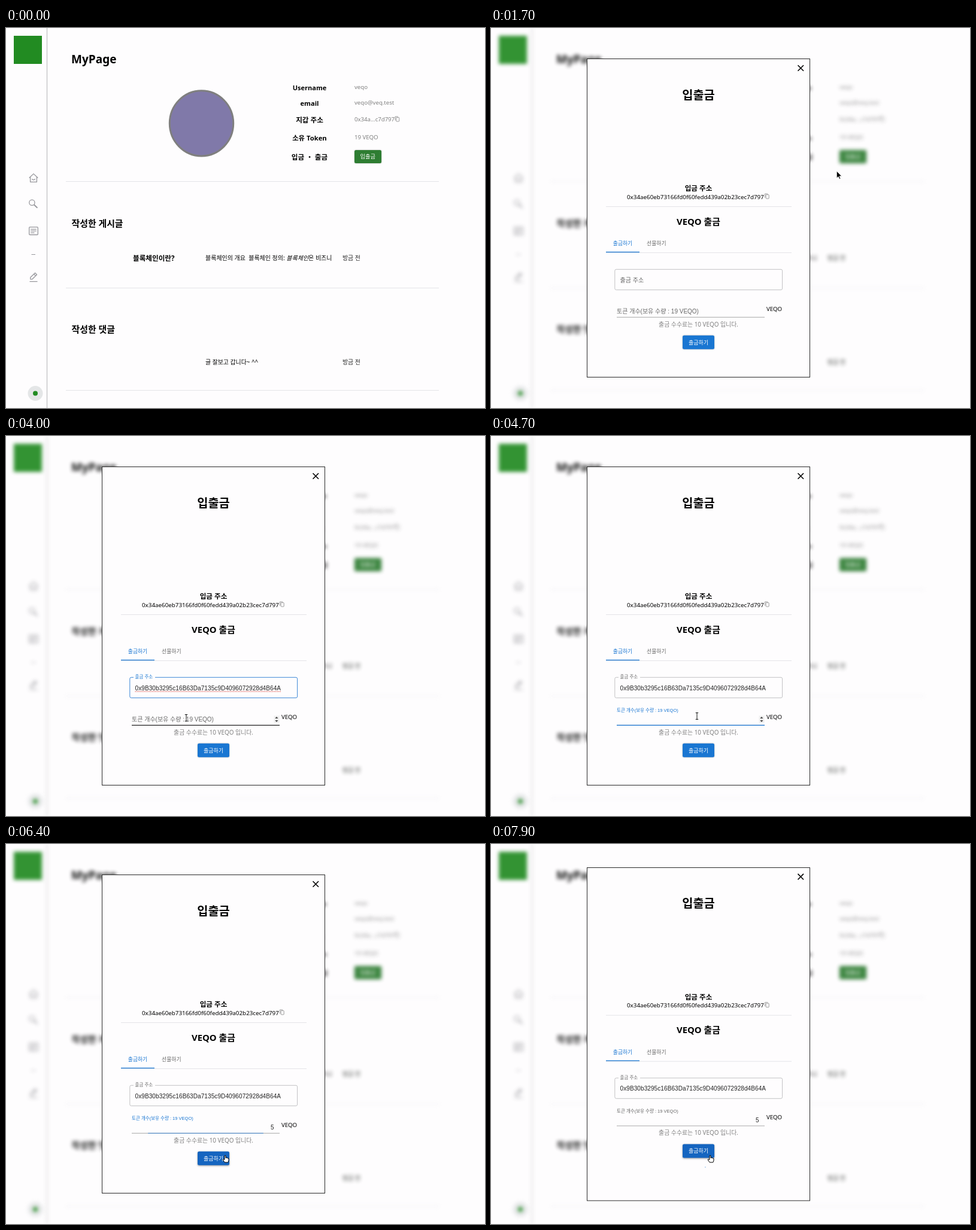
Animation of 800 by 635 pixels, one loop 8 s. Source, as an HTML page:

```html
<!DOCTYPE html>
<html lang="ko">
<head>
<meta charset="utf-8">
<title>MyPage</title>
<style>
  html, body { margin: 0; width: 100%; height: 100%; overflow: hidden; background: #fefdfe; }
  svg { display: block; width: 800px; height: 635px; }
  text { font-family: "Noto Sans", "Noto Sans CJK KR", "Noto Sans CJK", sans-serif; white-space: pre; }
  .ui { font-family: "Liberation Sans", "Noto Sans CJK KR", "Noto Sans CJK", sans-serif; }
  .icon { fill: none; stroke: #97979c; stroke-width: 1.3; stroke-linejoin: round; }
  .rule { stroke: #e4e4e8; }
  .soft { filter: drop-shadow(0 .8px .8px rgba(0,0,0,.3)); }
  .lift { filter: drop-shadow(0 1.5px 1.8px rgba(0,0,0,.4)); }
  .veiled { filter: blur(3.4px); opacity: .92; }
</style>
</head>
<body>
<svg id="stage" viewBox="0 0 800 635"></svg>
<script>
const LOOP = 8000, STEP = 100;
const BLUE = '#1976d2', GRAY = '#808080', LABEL = '#666';
const WALLET = '0x34ae60eb73166fd0f60fedd439a02b23cec7d797';
const TARGET = '0x9B30b3295c16B63Da7135c9D4096072928d4B64A';
const TOKEN = 'VEQO';

// Moments of the interaction, in ms
const AT = {
  enter: 100, hover: 1000, open: 1400, focusAddr: 2500, list: 2600, pick: 3300,
  hoverAmount: 3800, focusAmount: 4200, type: 5200, leaveAmount: 5700,
  hoverSend: 6000, blur: 6356, send: 6500
};

const text = (x, y, size, str, attrs = '') =>
  `<text x="${x}" y="${y}" font-size="${size}" ${attrs}>${str}</text>`;
const rule = (x1, x2, y) => `<path class="rule" d="M${x1} ${y}H${x2}"/>`;
const bold = 'font-weight="700"', mid = 'text-anchor="middle"';
const boldMid = `${bold} ${mid}`;
const gray = `fill="${GRAY}"`;
const copyIcon = (x, y) => `<g transform="translate(${x} ${y})" fill="none" stroke="#858585" stroke-width=".8">
  <rect x="2.2" y="2" width="5" height="6.6" rx=".8"/><path d="M.5 7V.5H5.4"/></g>`;

const page = `
<g id="page">
  <rect x="13" y="13" width="47" height="47" fill="#228b22"/>
  <path d="M68.5 0V635" stroke="#b4b4b6"/>
  <g class="icon">
    <path d="M38.7 250.5L46 243.6L53.3 250.5M40.6 249V257.3H51.4V249M43.2 252.2Q46 255.4 48.8 252.2"/>
    <circle cx="43.4" cy="291.8" r="4.6"/><path d="M46.8 295.2L52.4 300.6" stroke-width="2"/>
    <rect x="38.7" y="332.7" width="14.6" height="12.8" rx="1.2"/>
    <path d="M41.3 336.3H50.7M41.3 339.2H50.7M41.3 342.1H47.5"/>
    <path d="M42.5 378.5H49" stroke-width="1"/>
    <path d="M40.8 419.8V416.8L48.6 409.3L51.5 412.2L43.8 419.8ZM46.6 411.2L49.5 414.1M39.5 423.6H52.5"/>
  </g>
  <circle cx="49" cy="610.5" r="12.5" fill="#e4e6e7"/>
  <circle cx="49" cy="610.5" r="4" fill="#228b22"/>
  ${text(109, 58.5, 19, 'MyPage', bold)}
  <ellipse cx="326.5" cy="159.3" rx="53.2" ry="54.6" fill="#8079a9" stroke="#7f7f7f" stroke-width="3"/>
  ${text(507, 104, 11, 'Username', boldMid)}
  ${text(507, 129.5, 11.1, 'email', boldMid)}
  ${text(507, 158, 11.6, '지갑 주소', boldMid)}
  ${text(507, 188, 11.3, '소유 Token', boldMid)}
  ${text(507, 220, 11.6, '입금 ・ 출금', boldMid)}
  ${text(582, 102.3, 9.6, 'veqo', gray)}
  ${text(582, 128, 9.6, 'veqo@veq.test', gray)}
  ${text(582, 156, 9.6, '0x34a...c7d797', gray)}
  ${copyIcon(649.5, 147.5)}
  ${text(582, 185.7, 9.6, '19 ' + TOKEN, gray)}
  <rect id="openBtn" x="582" y="204" width="45" height="22" rx="2.5"/>
  ${text(604.3, 218.4, 9.2, '입출금', `${mid} fill="#fff" font-weight="500"`)}
  ${rule(100, 723, 256.5)}
  ${text(109.5, 331.5, 14.9, '작성한 게시글', bold)}
  ${text(212, 388.5, 11.6, '블록체인이란?', bold)}
  ${text(333, 388, 10, '블록체인의 개요\u00a0 블록체인 정의: <tspan font-style="italic">블록체인</tspan>은 비즈니', 'font-weight="500"')}
  ${text(562, 388, 9.9, '방금 전', 'fill="#222"')}
  ${rule(100, 723, 434.5)}
  ${text(109.5, 509, 14.9, '작성한 댓글', bold)}
  ${text(333, 562, 9.9, '글 잘보고 갑니다~ ^^', 'font-weight="500"')}
  ${text(562, 562, 9.9, '방금 전', 'fill="#222"')}
  ${rule(100, 723, 605.5)}
</g>`;

const modal = `
<g id="modal">
  <rect id="panel" x="160.5" width="372" fill="#fefdfe" stroke="#2a2a2a"/>
  <g id="body">
    <path d="M512.5 62.2L522 71.8M522 62.2L512.5 71.8" stroke="#000" stroke-width="1.6"/>
    ${text(346.5, 118.5, 19.8, '입출금', boldMid)}
    ${text(346.5, 272, 11.6, '입금 주소', boldMid)}
    ${text(227, 285.5, 9.82, WALLET)}
    ${copyIcon(457, 276.5)}
    ${rule(192, 502, 298.5)}
    ${text(346.5, 328.6, 14.9, TOKEN + ' 출금', boldMid)}
    ${text(220, 363.2, 8.8, '출금하기', `class="ui" ${mid} fill="${BLUE}" font-weight="500"`)}
    ${text(276.3, 363.2, 8.8, '선물하기', `class="ui" ${mid} fill="${LABEL}" font-weight="500"`)}
    ${rule(192, 502, 375.5)}
    <rect x="192" y="373.8" width="56" height="1.3" fill="${BLUE}"/>

    <rect id="addrBox" x="206.8" y="403.3" width="279.800" height="34.300" rx="2.500" fill="none"/>
    <rect id="notch" x="213" y="402" width="36" height="3" fill="#fefdfe"/>
    ${text(215.5, 425, 10, '출금 주소', 'id="addrLabel" class="ui"')}
    ${text(215.5, 425, 10, '0x', 'id="hint" class="ui" fill="#a9a9a9"')}
    ${text(215.5, 424.6, 10, TARGET, 'id="addr" class="ui" fill="#222" letter-spacing=".094"')}
    <path id="spell" d="M215.500 427H459" stroke="#d9463c" stroke-width="1" stroke-dasharray="1.6 1"/>
    <path id="addrCaret" d="M215.500 415.500V426.500" stroke="#222" stroke-width=".9"/>

    ${text(210, 477, 10, `토큰 개수(보유 수량 : 19 ${TOKEN})`, 'id="amountLabel" class="ui"')}
    <path id="line" d="M210 483.300H457"/>
    <path id="focusLine" d="M-123.500 0H123.500" stroke="${BLUE}" stroke-width="1.2"/>
    ${text(447.5, 477, 10, '5', 'id="amount" class="ui" text-anchor="end" fill="#222"')}
    <path id="amountCaret" d="M447.700 468V478.500" stroke="#222" stroke-width=".9"/>
    <g id="spin"><rect x="447.5" y="467.5" width="9" height="12" fill="#f0f0f0"/>
      <path d="M449.3 472L451.900 469L454.500 472ZM449.300 475L451.900 478L454.500 475Z" fill="#444"/></g>
    ${text(460, 472.7, 9.6, TOKEN)}
    ${text(346.5, 498.5, 9.9, `출금 수수료는 10 ${TOKEN} 입니다.`, `${mid} ${gray}`)}
    <rect id="sendBtn" x="320" y="513.8" width="53" height="23" rx="2.5"/>
    ${text(346.5, 528.7, 9, '출금하기', `class="ui" ${mid} fill="#fff" font-weight="500"`)}
    <g id="loader"><circle id="arc" r="20.2" fill="none" stroke="${BLUE}" stroke-width="3.6"/></g>

    <g id="list">
      <g style="filter:drop-shadow(0 .8px 1.2px rgba(0,0,0,.28))">
        <path d="M277 445H284.500L290 440L295.500 445H564.500Q566.500 445 566.500 447V498.500Q566.500 500.500 564.500 500.500H277Q275 500.500 275 498.500V447Q275 445 277 445Z" fill="#fefdfe"/>
      </g>
      <rect id="row" x="275" y="449" width="291.5" height="23" fill="#ececee"/>
      ${text(283.5, 464.4, 10.8, TARGET)}
      ${text(283.5, 489.2, 11, '달봄로731번길 52')}
    </g>
  </g>
</g>`;

const cursor = `
<g id="cursor" stroke-linejoin="round">
  <path id="arrow" d="M0 0V12L2.800 9.400L4.700 13.500L6.500 12.700L4.700 8.700H8.500Z" fill="#000" stroke="#fff" stroke-width=".8"/>
  <path id="hand" d="M-1 1Q0 -.5 1 1V4.500L2.600 4.300L4.300 4.900L6 5.600V9L4.800 12H-.8L-4 7.500Q-3.500 6 -1 7.500Z" fill="#fff" stroke="#000" stroke-width="1"/>
  <g id="beam" fill="none"><path d="M-2 -5.500H2M0 -5.500V5.500M-2 5.500H2" stroke="#fff" stroke-width="2.200"/>
    <path d="M-2.200 -5.500H2.200M0 -5.500V5.500M-2.200 5.500H2.200" stroke="#111" stroke-width="1"/></g>
</g>`;

document.getElementById('stage').innerHTML = page + modal + cursor;

const el = {};
document.querySelectorAll('[id]').forEach(n => el[n.id] = n);
const set = (id, attrs) => { for (const k in attrs) el[id].setAttribute(k, attrs[k]); };
const show = (id, on) => { el[id].style.display = on ? '' : 'none'; };
const clamp = v => Math.max(0, Math.min(1, v));
const ramp = (t, from, ms = 200) => clamp((t - from) / ms);
const mix = (a, b, p) => a + (b - a) * p;
const smooth = p => p * p * (3 - 2 * p);
const blink = (t, from) => t >= from && (t - from) % 1000 < 500;

// time, x, y of the pointer's hot spot
const PATH = [
  [100, 796, 330], [1000, 612, 212], [1500, 612, 212], [2400, 337, 426],
  [2800, 337, 426], [3200, 346, 461], [3400, 346, 461], [4000, 301, 471],
  [4200, 318, 470], [4600, 344, 468], [5400, 344, 468], [6100, 366, 520], [8000, 366, 520]
];
// time from which each pointer shape holds
const SHAPES = [[100, 'arrow'], [1000, 'hand'], [1400, 'arrow'], [2300, 'beam'],
  [3000, 'arrow'], [3800, 'beam'], [5700, 'arrow'], [6000, 'hand']];

function drawCursor(t) {
  show('cursor', t >= AT.enter);
  if (t < AT.enter) return;
  const i = Math.max(1, PATH.findIndex(k => k[0] >= t));
  const [t0, x0, y0] = PATH[i - 1], [t1, x1, y1] = PATH[i];
  const p = smooth((t - t0) / (t1 - t0));
  set('cursor', { transform: `translate(${mix(x0, x1, p)} ${mix(y0, y1, p)})` });
  const shape = SHAPES.filter(s => s[0] <= t).pop()[1];
  ['arrow', 'hand', 'beam'].forEach(id => show(id, id === shape));
}

function drawAddress(t) {
  const focused = t >= AT.focusAddr && t < AT.focusAmount;
  const filled = t >= AT.pick;
  const up = ramp(t, AT.focusAddr);
  const hovered = t >= 2300 && t < AT.focusAddr;
  set('addrBox', { stroke: focused ? '#3d88d6' : hovered ? '#222' : '#c2c2c4' });
  set('addrLabel', { y: mix(425, 405.3, up), 'font-size': mix(10, 7.5, up), fill: focused ? BLUE : LABEL });
  show('notch', up > 0);
  show('hint', up === 1 && !filled);
  show('addr', filled);
  show('spell', filled && focused);
  show('addrCaret', focused && !filled && blink(t, AT.focusAddr));
  show('list', t >= AT.list && t < AT.pick);
  show('row', t >= 3100);
}

function drawAmount(t) {
  const focused = t >= AT.focusAmount && t < AT.send;
  const hovered = t >= AT.hoverAmount && t < AT.leaveAmount;
  const up = ramp(t, AT.focusAmount);
  const dark = hovered && !focused;
  set('amountLabel', { y: mix(477, 461, up), 'font-size': mix(10, 7.5, up), fill: focused ? BLUE : LABEL });
  set('line', { stroke: dark ? '#222' : '#929292', 'stroke-width': dark ? 1.3 : .8 });
  const width = Math.min(up, 1 - ramp(t, AT.blur));
  show('focusLine', width > 0);
  set('focusLine', { transform: `translate(333.5 483.3) scale(${width} 1)`, opacity: width * width });
  show('amount', t >= AT.type);
  show('amountCaret', t < AT.blur && blink(t, AT.focusAmount));
  show('spin', hovered);
}

function drawLoader(t) {
  const p = ((t - AT.send) % 1400) / 1400;
  const half = p < .5, q = smooth(p * 2 % 1);
  set('loader', { transform: `translate(346.5 552) scale(.568) rotate(${360 * p})` });
  set('arc', {
    'stroke-dasharray': `${half ? mix(1, 100, q) : 100} 200`,
    'stroke-dashoffset': half ? mix(0, -15, q) : mix(-15, -125, q)
  });
}

function draw(t) {
  const open = t >= AT.open, sending = t >= AT.send;
  const overOpen = t >= AT.hover && !open, overSend = t >= AT.hoverSend;
  set('page', { class: open ? 'veiled' : '' });
  set('openBtn', { fill: overOpen ? '#1b5e20' : '#2e7d32', class: overOpen ? 'lift' : 'soft' });
  show('modal', open);
  set('panel', { y: sending ? 39.5 : 51.5, height: sending ? 556.5 : 532 });
  set('body', { transform: `translate(0 ${sending ? -12.3 : 0})` });
  set('sendBtn', { fill: overSend ? '#1565c0' : BLUE, class: overSend ? 'lift' : 'soft' });
  drawAddress(t);
  drawAmount(t);
  show('loader', sending);
  if (sending) drawLoader(t);
  drawCursor(t);
}

const start = performance.now();
let last = -1;
function tick() {
  const t = Math.floor(((performance.now() - start) % LOOP) / STEP) * STEP;
  if (t !== last) draw(last = t);
  requestAnimationFrame(tick);
}
tick();
</script>
</body>
</html>
```
